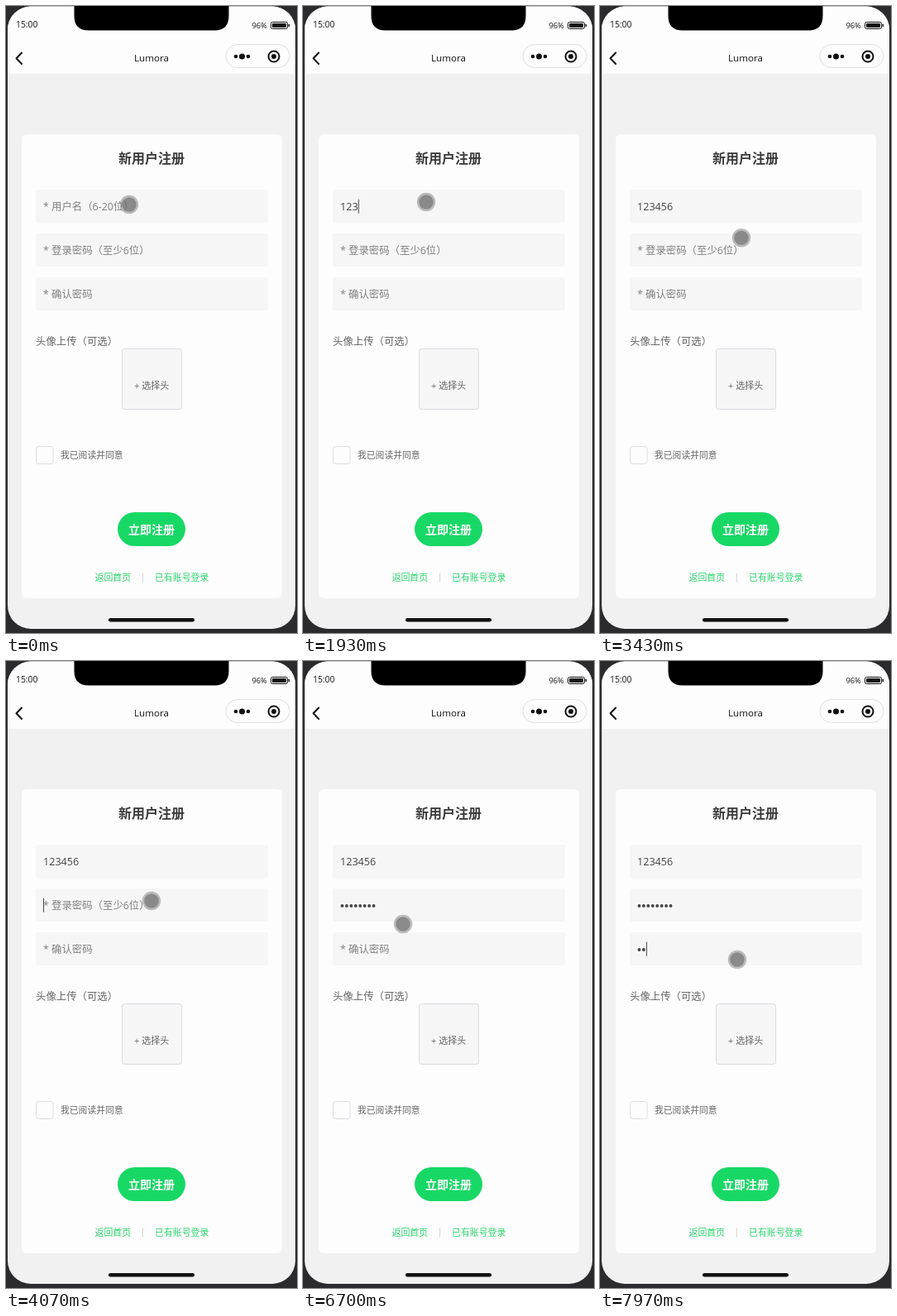
These frames come from a looping animation (352 by 758 pixels, 8 s). An HTML page:

```html
<!DOCTYPE html>
<html lang="zh-CN">
<head>
<meta charset="utf-8">
<title>新用户注册</title>
<style>
  html, body { margin: 0; width: 100%; height: 100%; overflow: hidden; background: #2b2b2d; }
  svg { display: block; width: 100%; height: 100%; }
  text { font-family: "Open Sans", "Noto Sans CJK SC", "Noto Sans CJK", sans-serif; font-size: 12.4px; fill: #666; }
  .mid { text-anchor: middle; }
  .hint { fill: #808080; }
  .typed { font-size: 12.6px; fill: #444; }
  .small { font-size: 10.8px; }
  .link { font-size: 10.9px; font-weight: 500; fill: #2bd46c; }
  .field { fill: #f6f6f7; }
  .line { fill: none; stroke: #dedee4; }
</style>
</head>
<body>
<svg viewBox="0 0 352 758" preserveAspectRatio="none">
  <defs>
    <clipPath id="screen"><rect x="2" y="0.5" width="348" height="752.5" rx="28"/></clipPath>
  </defs>
  <rect width="352" height="758" fill="#2b2b2d"/>
  <g clip-path="url(#screen)">
    <rect width="352" height="758" fill="#f1f1f2"/>
    <rect width="352" height="82" fill="#fdfdfd"/>
  </g>

  <path d="M82.5 0H269.5V12Q269.5 29.5 252 29.5H100Q82.5 29.5 82.5 12Z" fill="#000"/>
  <text x="12" y="26" style="font-size:10.3px;fill:#111">15:00</text>
  <text x="297.5" y="27" style="font-size:9.2px;fill:#111">96%</text>
  <rect x="320.5" y="19.5" width="20" height="8" rx="2" fill="none" stroke="#111"/>
  <rect x="322" y="21" width="17" height="5" rx="0.8" fill="#111"/>
  <rect x="341.6" y="21.7" width="1.4" height="3.6" rx="0.6" fill="#111"/>

  <path d="M19 56.5L12.5 63.2L19 70" fill="none" stroke="#111" stroke-width="2" stroke-linecap="round" stroke-linejoin="round"/>
  <text class="mid" x="176" y="67" style="font-size:11.6px;fill:#111">Lumora</text>
  <rect class="line" x="266" y="46.5" width="77" height="28" rx="14"/>
  <g fill="#111">
    <circle cx="278" cy="61" r="2.3"/>
    <circle cx="285.5" cy="61" r="3.5"/>
    <circle cx="293" cy="61" r="2.3"/>
    <circle cx="324" cy="61" r="3"/>
  </g>
  <circle cx="324" cy="61" r="6.5" fill="none" stroke="#111" stroke-width="2"/>

  <rect x="19" y="155" width="315" height="561" rx="6" fill="#fdfdfd"/>
  <text class="mid" x="176" y="190" style="font-size:16px;font-weight:700;fill:#3a3a3a">新用户注册</text>

  <g id="form"></g>

  <text x="36" y="410">头像上传（可选）</text>
  <rect class="field" x="140.5" y="414.5" width="72" height="73" rx="3" style="stroke:#dadae0"/>
  <text x="155" y="463" style="font-size:11px">+ 选择头</text>

  <rect class="line" x="36.5" y="532.5" width="20.5" height="21" rx="3"/>
  <text class="small" x="66" y="547">我已阅读并同意</text>

  <rect x="135" y="612" width="82" height="41" rx="20.5" fill="#18d865"/>
  <text class="mid" x="176" y="638" style="font-size:14px;font-weight:700;fill:#fdfdfd">立即注册</text>
  <text class="link" x="107.5" y="695">返回首页</text>
  <path d="M165.5 685.5V696.5" stroke="#d6d6da"/>
  <text class="link" x="180" y="695">已有账号登录</text>

  <rect x="124" y="740" width="104" height="4.6" rx="2.3" fill="#111"/>

  <path id="caret" d="M0 -8.5V8.5" stroke="#444"/>
  <g id="pointer">
    <circle r="11.2" fill="#808080" fill-opacity=".5"/>
    <circle r="8.8" fill="#6c6c6c" fill-opacity=".62"/>
  </g>
</svg>
<script>
const LOOP = 8000, BLINK = 530;
const $ = id => document.getElementById(id);

function add(parent, tag, attrs, text = '') {
  const el = document.createElementNS('http://www.w3.org/2000/svg', tag);
  for (const k in attrs) el.setAttribute(k, attrs[k]);
  el.textContent = text;
  return parent.appendChild(el);
}

// focus: when tapped; first/gap: key timing; step: advance per character
const fields = [
  { y: 222, h: 40.5, hint: '* 用户名（6-20位）', focus: 1250, first: 1500, gap: 200, count: 6, step: 7.25 },
  { y: 275, h: 40, hint: '* 登录密码（至少6位）', focus: 3850, first: 4450, gap: 230, count: 8, step: 5.45, secret: true },
  { y: 328, h: 40, hint: '* 确认密码', focus: 7250, first: 7600, gap: 230, count: 8, step: 5.45, secret: true }
];

for (const f of fields) {
  const g = $('form');
  f.mid = f.y + 20.2;
  add(g, 'rect', { class: 'field', x: 36, y: f.y, width: 281, height: f.h, rx: 3 });
  f.label = add(g, 'text', { class: 'hint', x: 45, y: f.mid + 4.5 }, f.hint);
  if (f.secret) {
    f.dots = Array.from({ length: f.count }, (_, i) =>
      add(g, 'circle', { cx: 47.4 + i * f.step, cy: f.mid + 0.8, r: 1.9, fill: '#444' }));
  } else {
    f.value = add(g, 'text', { class: 'typed', x: 45, y: f.mid + 4.7 });
  }
}

// start, end, x, y
const moves = [
  [150, 550, 149, 237],
  [2850, 3650, 176, 290],
  [6250, 6700, 121, 318],
  [6700, 7150, 166, 361]
];
const ease = p => p * p * (3 - 2 * p);

function pointerAt(t) {
  let x = 149, y = 240;
  for (const [a, b, tx, ty] of moves) {
    const p = ease(Math.min(1, Math.max(0, (t - a) / (b - a))));
    x += (tx - x) * p;
    y += (ty - y) * p;
  }
  return [x, y];
}

function draw(t) {
  let active = null;
  for (const f of fields) {
    f.n = Math.min(f.count, Math.max(0, Math.floor((t - f.first) / f.gap) + 1));
    f.label.style.display = f.n ? 'none' : '';
    if (f.secret) f.dots.forEach((d, i) => d.style.display = i < f.n ? '' : 'none');
    else f.value.textContent = '123456'.slice(0, f.n);
    if (t >= f.focus) active = f;
  }

  let shown = false;
  if (active) {
    const last = active.n ? active.first + (active.n - 1) * active.gap : active.focus;
    shown = Math.floor((t - last) / BLINK) % 2 === 0;
    $('caret').setAttribute('transform', `translate(${45.5 + active.n * active.step} ${active.mid})`);
  }
  $('caret').style.display = shown ? '' : 'none';
  $('pointer').setAttribute('transform', `translate(${pointerAt(t).join(' ')})`);
}

const start = performance.now();
function tick() {
  draw((performance.now() - start) % LOOP);
  requestAnimationFrame(tick);
}
tick();
</script>
</body>
</html>
```
